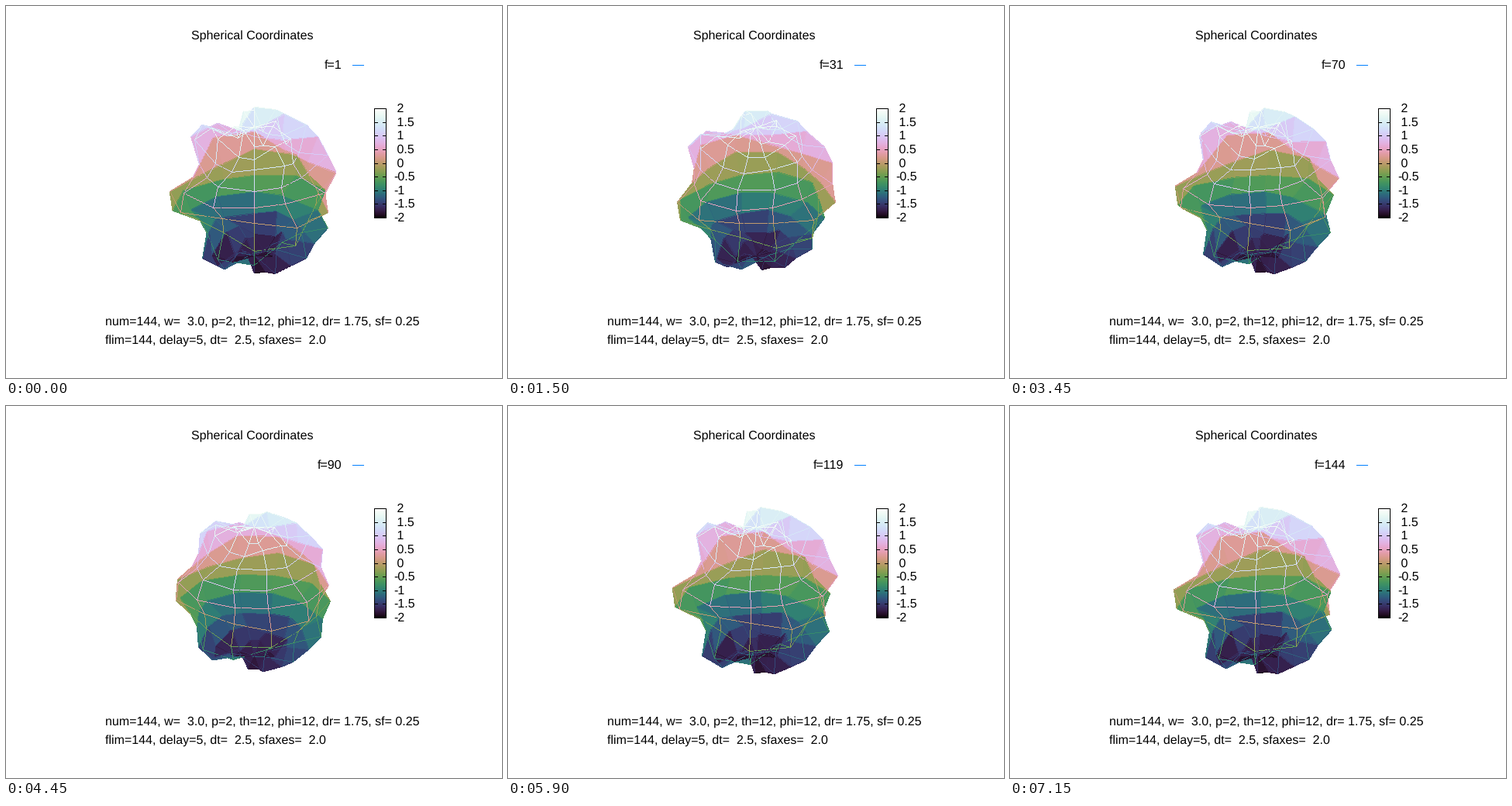
These frames come from a looping animation (640 by 480 pixels, 7.2 s). A matplotlib script:

```python
import numpy as np
import matplotlib.pyplot as plt
from matplotlib.animation import FuncAnimation
from matplotlib.collections import PolyCollection
from matplotlib.colors import ListedColormap
from matplotlib.patches import Rectangle

W, H, DPI = 640, 480, 96
FRAMES, INTERVAL = 144, 50
CX, CY, SCALE = 320.5, 239.5, 54.6   # screen centre and pixels per unit
DR, SF, STEP = 1.75, 0.25, 2.5
PX = 72 / DPI                        # one pixel in points
TILT = np.radians(30)

plt.rcParams.update({
    "font.family": "Liberation Sans",
    "font.size": 12,
    "text.hinting": "none",
    "text.kerning_factor": 0,
})

fig = plt.figure(figsize=(W / DPI, H / DPI), dpi=DPI, facecolor="white")
ax = fig.add_axes([0, 0, 1, 1])
ax.axis("off")


def cubehelix(gray, start=0.5, cycles=-1.5, gamma=1.5):
    phi = 2 * np.pi * (start / 3 + gray * cycles)
    level = gray ** (1 / gamma)
    amp = level * (1 - level) / 2
    c, s = np.cos(phi), np.sin(phi)
    rgb = [level + amp * (-0.14861 * c + 1.78277 * s),
           level + amp * (-0.29227 * c - 0.90649 * s),
           level + amp * 1.97294 * c]
    return np.clip(np.stack(rgb, axis=-1), 0, 1)


cmap = ListedColormap(cubehelix(np.linspace(0, 1, 1024)))


def shade(z, **kw):
    return cmap((z + 2) / 4, **kw)


def label(x, y, text, ha="left"):
    return ax.text(x, y, text, ha=ha, va="baseline", color="black")


def stroke(xs, y, color="black"):
    ax.plot(xs, [y, y], color=color, lw=PX, snap=False,
            solid_capstyle="butt")


# Fixed text and key
label(239, 43, "Spherical Coordinates")
label(128, 412, "num=144, w=  3.0, p=2, th=12, phi=12, dr= 1.75, sf= 0.25")
label(128, 436, "flim=144, delay=5, dt=  2.5, sfaxes=  2.0")
counter = label(433.5, 81, "", ha="right")
stroke([447, 462], 76.5, "#0080ff")

# Colour box
LEFT, RIGHT, TOP, BOTTOM = 475.5, 490.5, 132.5, 273.5
ax.imshow(np.linspace(1, 0, 256)[:, None], cmap=cmap, vmin=0, vmax=1,
          extent=(LEFT, RIGHT, BOTTOM, TOP), aspect="auto",
          interpolation="nearest")
ax.add_patch(Rectangle((LEFT, TOP), RIGHT - LEFT, BOTTOM - TOP, fill=False,
                       ec="black", lw=PX, snap=False, zorder=3))
for v in np.arange(-2, 2.1, 0.5):
    y = np.floor(BOTTOM + (v + 2) / 4 * (TOP - BOTTOM)) + 0.5
    stroke([LEFT, LEFT + 4.5], y)
    stroke([RIGHT - 4.5, RIGHT], y)
    label(500, y + 4.5, f"{v: g}")

# Bumpy sphere on a 12 x 12 grid
lat, lon = np.meshgrid(np.radians(np.linspace(-90, 90, 13)),
                       np.radians(np.linspace(-180, 180, 13)), indexing="ij")
bumps = np.sqrt(2) * np.cos(6 * lat - 3 * lon + np.radians(135))
bumps[[0, -1]] = 0

surface = PolyCollection([], linewidths=0, antialiaseds=False, zorder=1)
ax.add_collection(surface, autolim=False)
wires = ax.imshow(np.zeros((H, W, 4), np.uint8), extent=(0, W, H, 0),
                  aspect="auto", interpolation="nearest", zorder=2)
ax.set_xlim(0, W)
ax.set_ylim(H, 0)


def corners(a):
    return np.stack([a[:-1, :-1], a[:-1, 1:], a[1:, 1:], a[1:, :-1]], axis=2)


def edges(a):
    """Both ends of every grid edge, along rows and then along columns."""
    tail = a.shape[2:]
    start = [a[:, :-1].reshape(-1, *tail), a[:-1].reshape(-1, *tail)]
    end = [a[:, 1:].reshape(-1, *tail), a[1:].reshape(-1, *tail)]
    return np.concatenate(start), np.concatenate(end)


def draw_wires(points, z):
    """One-pixel lines without smoothing."""
    a, b = edges(np.floor(points))
    z0, z1 = edges(z)
    steps = np.maximum(np.abs(b - a).max(axis=1), 1)
    t = np.minimum(np.arange(steps.max() + 1) / steps[:, None], 1)
    path = a[:, None] + (b - a)[:, None] * t[..., None]
    col, row = np.rint(path).astype(int).transpose(2, 0, 1)
    layer = np.zeros((H, W, 4), np.uint8)
    layer[row, col] = shade((z0 + z1) / 2, bytes=True)[:, None]
    return layer


def update(i):
    turn = np.radians(STEP * i)
    r = DR + SF * np.cos(3 * turn) * bumps
    x = r * np.cos(lat) * np.sin(lon + turn)
    y = r * np.cos(lat) * np.cos(lon + turn)
    z = r * np.sin(lat)
    depth = y * np.cos(TILT) + z * np.sin(TILT)
    points = np.stack([CX + SCALE * x,
                       CY + SCALE * (y * np.sin(TILT) - z * np.cos(TILT))],
                      axis=2)

    order = np.argsort(-corners(depth).mean(axis=2).ravel())
    surface.set_verts(corners(points).reshape(-1, 4, 2)[order])
    surface.set_facecolor(shade(corners(z).mean(axis=2).ravel()[order]))
    wires.set_data(draw_wires(points, z))
    counter.set_text(f"f={i + 1}")
    return surface, wires, counter


anim = FuncAnimation(fig, update, frames=FRAMES, interval=INTERVAL,
                     repeat=True, repeat_delay=0)
plt.show()
```
